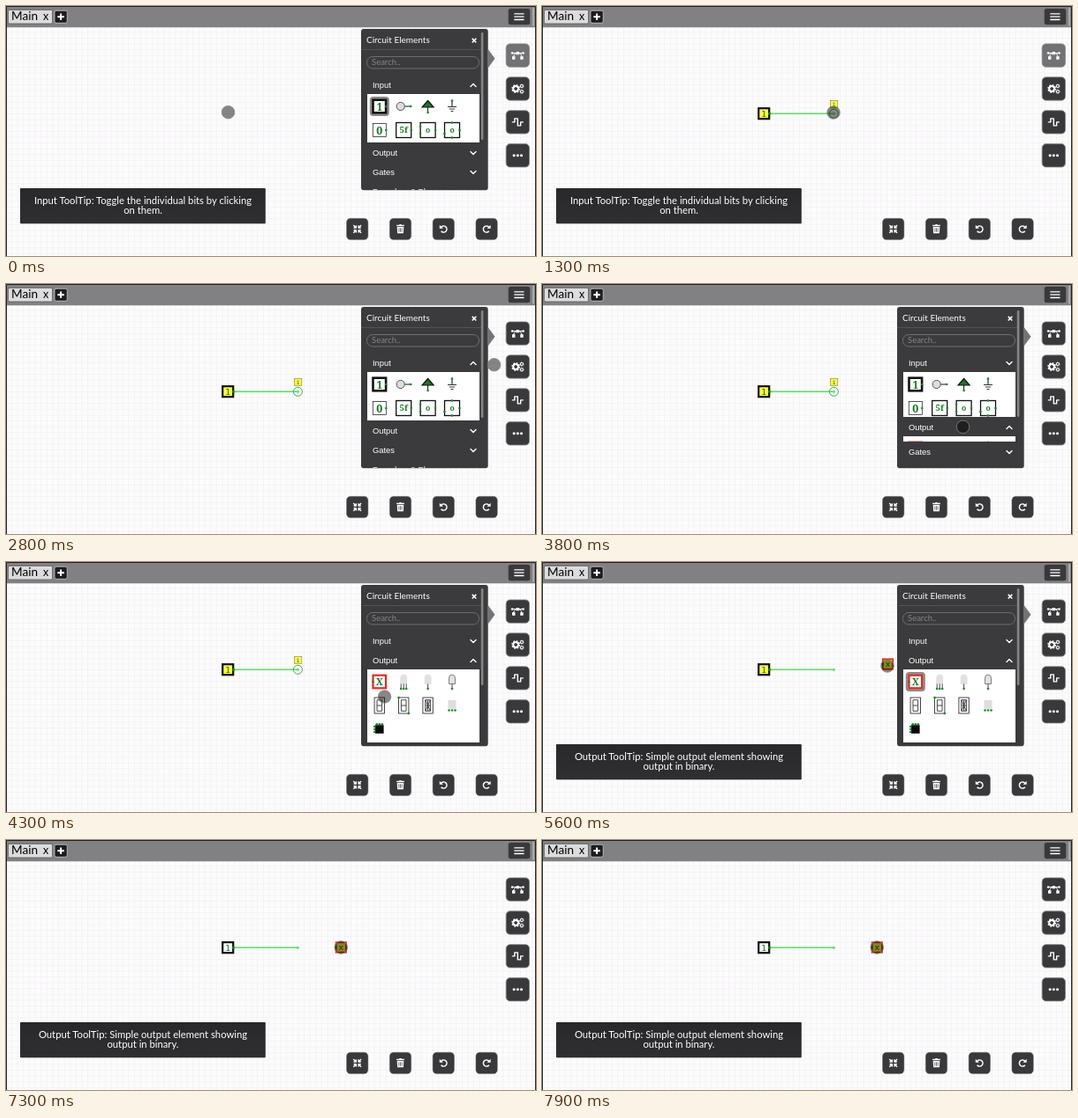
Animation, 600 px wide and 284 px high, one loop 8000 ms. Source, as an HTML page:

```html
<!DOCTYPE html>
<html lang="en">
<head>
<meta charset="utf-8">
<title>Circuit editor</title>
<style>
html, body { margin: 0; width: 100%; height: 100%; overflow: hidden; background: #fdfcfd; }
svg { display: block; width: 100vw; height: 100vh; }
text { font-family: Lato, "Open Sans", sans-serif; }
.head { font: 9.4px "Liberation Sans", Arial, sans-serif; fill: #fff; }
.tip { font-size: 11.25px; fill: #fff; text-anchor: middle; }
.serif { font-family: "Noto Serif", "Liberation Serif", serif; font-weight: 700; fill: #157a22; text-anchor: middle; }
.glyph { font-family: "DejaVu Sans", sans-serif; fill: #1c6a20; text-anchor: middle; font-size: 9.5px; }
.btn { fill: #39393b; stroke: #8e8e90; stroke-width: .8; }
.tool { fill: #39393b; stroke: #6a6a6c; stroke-width: .4; }
.ico { fill: none; stroke: #fff; stroke-width: 1.4; stroke-linejoin: round; }
.solid { fill: #fff; }
.chev { fill: none; stroke: #fff; stroke-width: 1.4; stroke-linecap: round; stroke-linejoin: round; }
.pin { fill: #128a26; }
.line { fill: none; stroke: #333; stroke-width: .9; }
.box { fill: #fff; stroke: #111; stroke-width: 1.3; }
</style>
</head>
<body>
<svg viewBox="0 0 600 284" xmlns="http://www.w3.org/2000/svg">
  <defs>
    <pattern id="grid" x="251" y="122" width="6.62" height="6.62" patternUnits="userSpaceOnUse">
      <path d="M0 .4H6.62M.4 0V6.62" stroke="#f2f0f3" stroke-width=".8"/>
    </pattern>
    <clipPath id="panelClip"><rect x="402" y="50" width="144" height="159"/></clipPath>
    <clipPath id="inClip"><rect id="inRect" x="409" y="100" width="127" height="55"/></clipPath>
    <clipPath id="outClip"><rect id="outRect" x="409" y="0" width="127" height="0"/></clipPath>
    <linearGradient id="tipFill" x2="0" y2="1">
      <stop stop-color="#29292b"/><stop offset="1" stop-color="#2f2f31"/>
    </linearGradient>
  </defs>

  <rect width="600" height="284" fill="#fdfcfd"/>
  <rect width="600" height="284" fill="url(#grid)"/>

  <g id="wire">
    <path id="wireLine" stroke="#55e063" stroke-width="1.5" fill="none"/>
    <circle id="wireEnd" cy="122.3" r="1.6" fill="#6ae276"/>
    <g id="probe">
      <circle cx="330.4" cy="122.3" r="5" fill="none" stroke="#35b545"/>
      <rect x="326.4" y="107.3" width="8.4" height="8" fill="#ffff3c" stroke="#8a8a5a" stroke-width=".7"/>
      <text class="glyph" x="330.6" y="113.5" style="font-size:6px">1</text>
    </g>
  </g>
  <g id="source">
    <rect id="sourceBox" x="245.2" y="116.2" width="12" height="12" stroke="#111" stroke-width="2.2"/>
    <text class="glyph" x="251.2" y="125.7">1</text>
    <circle class="pin" cx="257.6" cy="122.2" r="1.5"/>
  </g>
  <g id="sink">
    <rect x="-5.7" y="-5.7" width="11.4" height="11.4" fill="#ffff3c" stroke="#f0261c" stroke-width="1.8"/>
    <text class="glyph" y="3.4">x</text>
    <circle class="pin" cx="-6" r="1.5"/>
  </g>

  <rect width="600" height="24.3" fill="#818183"/>
  <rect x="596.3" y="2" width="1.4" height="20.5" fill="#bdbdbf"/>
  <path d="M.5 284V.5h599V284" fill="none" stroke="#1f1f21"/>
  <rect x="2.5" y="4.5" width="50" height="15.5" rx="1.5" fill="#dcdcde" stroke="#555" stroke-width=".7"/>
  <text x="6" y="16.1" font-size="13.6">Main</text>
  <text x="42" y="16.1" font-size="12.5">x</text>
  <rect x="55" y="5.3" width="14.2" height="14" rx="2" fill="#1c1c1e" stroke="#ddd" stroke-width=".7"/>
  <path d="M58.3 12.3h7.6M62.1 8.5v7.6" stroke="#fff" stroke-width="2"/>
  <rect x="568.7" y="3" width="24.6" height="18.3" rx="2.5" fill="#39393b"/>
  <path d="M575.3 8.9h11.2M575.3 12.2h11.2M575.3 15.5h11.2" stroke="#fff" stroke-width="1.3"/>

  <g id="side"></g>
  <g id="tools"></g>

  <g id="tip">
    <rect x="16" y="207" width="277.8" height="40.2" rx="1" fill="url(#tipFill)"/>
    <text class="tip" id="tip1" x="155" y="225.4"></text>
    <text class="tip" id="tip2" x="155" y="236.2"></text>
  </g>

  <g id="panel">
    <path d="M546 49.5l7.5 10.2-7.5 10.3z" fill="#747476"/>
    <rect x="402" y="26" width="143.7" height="183.3" rx="3" fill="#3b3b3d"/>
    <path d="M402 49.5h136" stroke="#59595b" stroke-width=".8"/>
    <text x="408" y="42.3" font-size="10" fill="#fff">Circuit Elements</text>
    <path d="M527.7 36.9l4.6 4.6m0-4.6l-4.6 4.6" stroke="#fff" stroke-width="1.5"/>
    <rect x="408.5" y="57.5" width="127" height="13.5" rx="6.5" fill="none" stroke="#737375" stroke-width=".9"/>
    <text x="414" y="67.3" font-size="9.5" fill="#858587">Search..</text>
    <rect id="thumb" x="537.8" y="30" width="2.6" rx="1.3" fill="#858587"/>
    <g clip-path="url(#panelClip)">
      <text class="head" x="415" y="93.3">Input</text>
      <path class="chev" id="inChev"/>
      <g clip-path="url(#inClip)">
        <rect x="409" y="100" width="127" height="56" fill="#fff"/>
        <g id="inputs"></g>
      </g>
      <g id="outHead">
        <text class="head" x="415" y="3.3">Output</text>
        <path class="chev" id="outChev"/>
      </g>
      <g clip-path="url(#outClip)">
        <g id="outputs"></g>
      </g>
      <g id="rest">
        <text class="head" x="415" y="3.3">Gates</text>
        <path class="chev" d="M526-1.5l3 3 3-3"/>
        <text class="head" x="415" y="25.3">Decoders &amp; Plexers</text>
        <path class="chev" d="M526 20.5l3 3 3-3"/>
      </g>
    </g>
  </g>

  <circle id="cursor" r="7.3" fill="#000" fill-opacity=".47" stroke="#888" stroke-opacity=".9" stroke-width=".9"/>
</svg>
<script>
const $ = id => document.getElementById(id);
const set = (id, attrs) => { for (const k in attrs) $(id).setAttribute(k, attrs[k]); };
const show = (id, on) => set(id, { display: on ? 'inline' : 'none' });
const move = (id, x, y) => set(id, { transform: `translate(${x} ${y})` });
const at = (x, y, body) => `<g transform="translate(${x} ${y})">${body}</g>`;
const pins = (...p) => p.map(([x, y]) => `<circle class="pin" cx="${x}" cy="${y}" r="1.3"/>`).join('');
const hover = id => `<rect id="${id}" x="-10.5" y="-10.5" width="21" height="21" rx="3" fill="#929294" stroke="#666" stroke-width=".7"/>`;

// Buttons
const gear = (x, y, r) => `<g transform="translate(${x} ${y})" fill="none" stroke="#fff">
  <circle r="${r}" stroke-width="${r * .7}"/>
  <circle r="${r * 1.45}" stroke-width="${r * .5}" stroke-dasharray="${r * .57}"/></g>`;
const turn = '<path class="ico" d="M-3-1.7a3.6 3.6 0 1 1 .3 4"/><path class="solid" d="M-4.5-4.7v4h4z"/>';
const sideIcons = [
  `<path class="ico" style="stroke-width:1" d="M-4.6 2C-4.6-.5-3-2.4-1-2.4H1C3-2.4 4.6-.5 4.6 2M-6-2.6H6"/>
   <path class="solid" d="M-1.7-4.2h3.4v3.4h-3.4zM-6.3 1.2h3.4v3.4h-3.4zM2.9 1.2h3.4v3.4H2.9z"/>
   <circle class="solid" cx="-6.2" cy="-2.6" r="1.3"/><circle class="solid" cx="6.2" cy="-2.6" r="1.3"/>`,
  gear(-2.2, 0, 2.9) + gear(4.6, -3, 1.5) + gear(4.6, 3.2, 1.5),
  '<path class="ico" d="M-6.5 0h3v-4h3.5v8h3.3v-4h3.2"/>',
  [-4.2, 0, 4.2].map(x => `<circle class="solid" cx="${x}" r="1.55"/>`).join('')
];
const arrow = '<path class="ico" style="stroke-width:1.4" d="M4.4 4.4L1.5 1.5M1.4 4.1V1.4h2.7"/>';
const toolIcons = [
  [0, 90, 180, 270].map(a => `<g transform="rotate(${a})">${arrow}</g>`).join(''),
  `<path class="solid" d="M-4.4-4.6h2.9l.6-.9h1.8l.6.9h2.9v1.2h-8.8zM-3.8-2.7h7.6l-.4 7.6h-6.8z"/>
   <path d="M-1.7-1.1v4.4M0-1.1v4.4M1.7-1.1v4.4" stroke="#39393b" stroke-width=".7"/>`,
  turn,
  `<g transform="scale(-1 1)">${turn}</g>`
];
$('side').innerHTML = sideIcons.map((icon, i) => at(579.3, 56.1 + 37.9 * i,
  `<rect class="btn" ${i ? '' : 'id="mainBtn"'} x="-13.2" y="-13.2" width="26.4" height="26.4" rx="4.5"/>` + icon)).join('');
$('tools').innerHTML = toolIcons.map((icon, i) => at(397.7 + 48.8 * i, 253.4,
  '<rect class="tool" x="-12.2" y="-12.2" width="24.4" height="24.4" rx="4.5"/>' + icon)).join('');

// Palette icons
const boxed = (label, size, p) =>
  `<rect class="box" x="-8.5" y="-8.5" width="17" height="17"/><text class="serif" y="3.4" font-size="${size}">${label}</text>` + pins(...p);
const led = (legs, edge) =>
  `<path d="M-3.5 2.5V-4a3.5 4 0 0 1 7 0v6.5z" fill="#e1e1e1" stroke="${edge}" stroke-width=".8"/>` +
  legs.map(x => `<path class="line" d="M${x} 2.5v5.5"/>` + pins([x, 8])).join('');
const digit = extra =>
  `<rect class="line" x="-5.7" y="-9" width="11.4" height="18" fill="#fff"/><path class="line" d="M-2.8-6.3h5.6v12.6h-5.6zM-2.8 0h5.6${extra}"/>`;

const inputIcons = [
  hover('inHover') + '<rect x="-7.3" y="-7.3" width="14.6" height="14.6" fill="#fff" stroke="#111" stroke-width="2.6"/><text class="serif" y="4.5" font-size="12">1</text>' + pins([7.5, 0]),
  '<path d="M1 0h7" stroke="#27482b" stroke-width="1.2"/><circle cx="-3.5" r="4.6" fill="#ddd" stroke="#555"/>' + pins([8, 0]),
  '<path d="M0-6.5L6.5 1h-13z" fill="#167a22" stroke="#111" stroke-width="1.2"/><path d="M0 1v6" stroke="#111"/>' + pins([0, 7]),
  '<path class="line" style="stroke-width:1.2" d="M0-6.5v7M-5 .5H5M-3.2 3h6.4M-1.4 5.5h2.8"/>' + pins([0, -6.5]),
  '<rect class="box" style="stroke-width:.7" x="-7.5" y="-7.5" width="15" height="15"/><text class="serif" y="4.5" font-size="12.5">0</text>' + pins([7.5, 0]),
  boxed('5f', 9.5, [[8.5, 0]]),
  boxed('o', 8.5, [[8.5, 0], [-8.5, 4], [-8.5, -4]]),
  boxed('o', 8.5, [[8.5, 0], [-8.5, 4], [0, -8.5], [0, 8.5]])
];
const outputIcons = [
  hover('outHover') + '<rect x="-7.3" y="-7.3" width="14.6" height="14.6" fill="#fff" stroke="#f0261c" stroke-width="2.2"/><text class="serif" y="4" font-size="10.5">X</text>' + pins([-7.5, 0]),
  led([-3, 0, 3], '#ddd'),
  led([0], '#ddd'),
  led([0], '#666'),
  digit(''),
  digit('') + pins([-5.7, -9], [5.7, 9]),
  digit('M0-6.3V6.3M-2.8-6.3l5.6 12.6M2.8-6.3l-5.6 12.6'),
  '<rect x="-4.5" y="-6" width="9" height="10" fill="#dedede"/>' + pins([-3.5, 5.5], [0, 5.5], [3.5, 5.5]),
  '<rect x="-4.8" y="-4.8" width="9.6" height="9.6" fill="#0b0b0b"/>' + pins([-5.5, -3], [-5.5, 0], [-5.5, 3], [-3, -5.7], [0, -5.7], [3, -5.7])
];
const palette = (icons, y) => icons.map((icon, i) => at(422.8 + 27.4 * (i % 4), y + 27 * (i >> 2), icon)).join('');
$('inputs').innerHTML = palette(inputIcons, 114);
$('outputs').innerHTML = '<rect x="409" width="127" height="84" fill="#fff"/>' + palette(outputIcons, 14);

// Timeline: time, x, y
const path = [
  [0, 251.5, 120.7], [500, 251.5, 120.7], [1300, 330, 121], [1600, 330, 121],
  [2300, 585, 60], [2500, 585, 60], [3300, 480, 163], [3700, 480, 163],
  [4300, 428.5, 153], [4500, 420.5, 140], [5300, 420.5, 140], [5600, 391, 118],
  [5900, 332.5, 134], [6500, 332.5, 134], [7100, 379.3, 122], [8000, 379.3, 122]
];
const swing = p => .5 - Math.cos(Math.PI * Math.min(1, Math.max(0, p))) / 2;
const chevron = up => up ? 'M526 1.5l3-3 3 3' : 'M526-1.5l3 3 3-3';
const tips = [
  ['Input ToolTip: Toggle the individual bits by clicking', 'on them.'],
  ['Output ToolTip: Simple output element showing', 'output in binary.']
];

function cursorAt(t) {
  const i = path.findIndex(p => p[0] > t);
  const [t0, x0, y0] = path[i - 1], [t1, x1, y1] = path[i];
  const k = swing((t - t0) / (t1 - t0));
  return [x0 + (x1 - x0) * k, y0 + (y1 - y0) * k];
}

function draw(t) {
  const [cx, cy] = cursorAt(t);
  move('cursor', cx, cy);

  show('source', t >= 100);
  set('sourceBox', { fill: t < 7200 ? '#ffff3c' : '#fff' });
  const end = t < 1300 ? Math.max(257.5, cx) : 330.4;
  show('wire', t >= 500);
  set('wireLine', { d: `M257.5 122.3H${end}` });
  set('wireEnd', { cx: end });
  show('probe', t >= 1300 && t < 5300);
  show('sink', t >= 5600);
  move('sink', ...(t < 7200 ? [391.5, 116] : [379.3, 122]));

  const open = swing((t - 3730) / 400), switched = t >= 3700;
  const inH = 55 * (1 - open), outH = 83 * open;
  show('panel', t < 100 || (t >= 2500 && t < 7200));
  set('inRect', { height: inH });
  set('outRect', { y: 122 + inH, height: outH });
  move('outHead', 0, 112 + inH);
  move('outputs', 0, 122 + inH);
  move('rest', 0, 134 + inH + outH);
  set('thumb', { height: 122 - 12 * open });
  set('inChev', { d: chevron(!switched), transform: 'translate(0 90)' });
  set('outChev', { d: chevron(switched) });
  show('inHover', t < 100);
  show('outHover', t >= 5100);
  $('mainBtn').style.fill = t < 2600 ? '#727274' : '';

  const tip = tips[t < 5300 ? 0 : 1];
  show('tip', t < 2800 || t >= 5300);
  $('tip1').textContent = tip[0];
  $('tip2').textContent = tip[1];
}

const start = performance.now();
function frame() {
  const t = (performance.now() - start) % 8000;
  draw(Math.floor(t / 100) * 100);
  requestAnimationFrame(frame);
}
frame();
</script>
</body>
</html>
```
